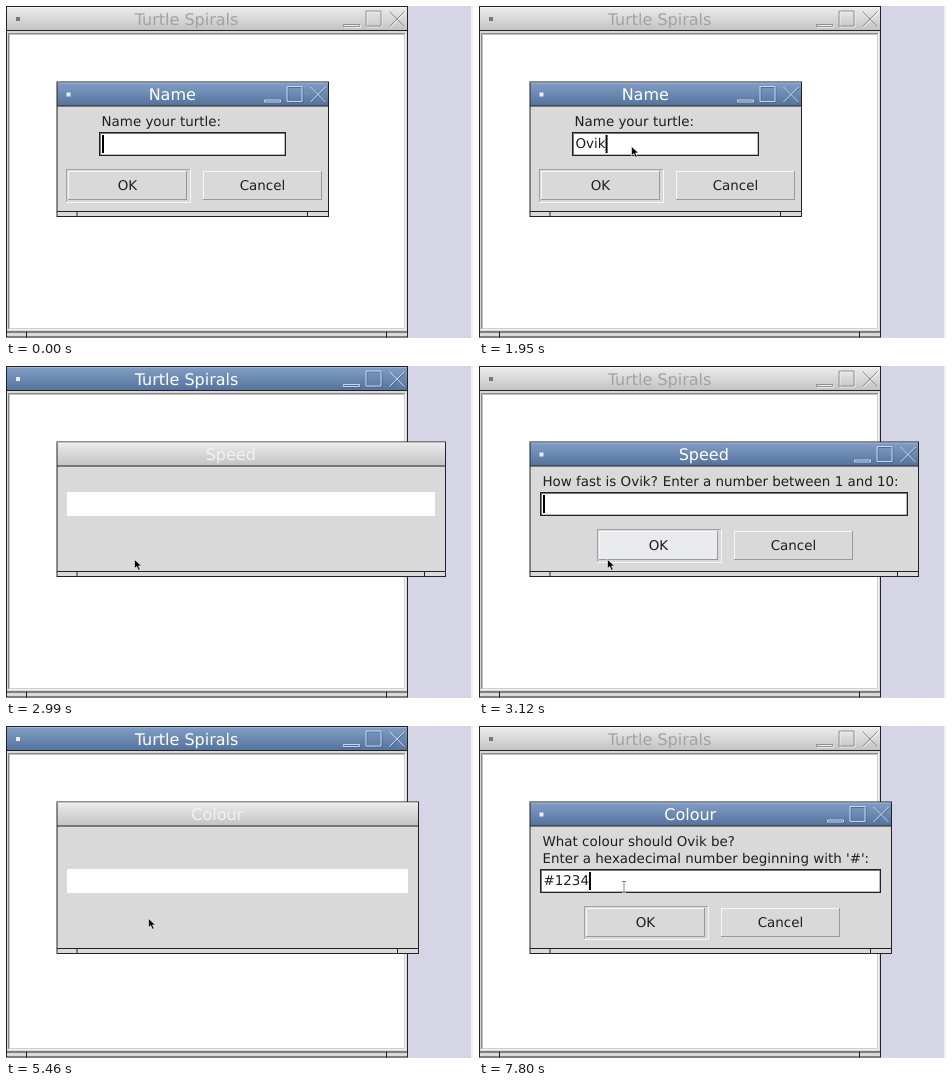
An HTML page that plays this animation: 467 by 332 pixels, repeating every 8 s.

```html
<!DOCTYPE html>
<html lang="en">
<head>
<meta charset="utf-8">
<title>Turtle Spirals</title>
<style>
html, body { margin: 0; width: 467px; height: 332px; overflow: hidden; background: #d6d5e6; }
svg { display: block; }
text { font: 13.45px "DejaVu Sans", sans-serif; white-space: pre; text-rendering: geometricPrecision; }
.title { font-size: 16px; text-anchor: middle; }
.mid { text-anchor: middle; }
</style>
</head>
<body>
<svg id="stage" width="467" height="332" viewBox="0 0 467 332">
  <defs>
    <linearGradient id="on" x2="0" y2="1">
      <stop offset="0" stop-color="#829ec5"/><stop offset="1" stop-color="#54739d"/>
    </linearGradient>
    <linearGradient id="off" x2="0" y2="1">
      <stop offset="0" stop-color="#ececec"/><stop offset="1" stop-color="#c3c3c3"/>
    </linearGradient>
  </defs>
  <g id="view"></g>
</svg>
<script>
const LOOP = 8000;
const view = document.getElementById('view');
const pen = document.createElement('canvas').getContext('2d');
pen.font = '13.45px "DejaVu Sans", sans-serif';

const rect = (x, y, w, h, fill) =>
  `<rect x="${x}" y="${y}" width="${w}" height="${h}" fill="${fill}"/>`;
const text = (x, y, s, cls = '', fill = '#1e1e1e') =>
  `<text x="${x}" y="${y}" class="${cls}" fill="${fill}">${s}</text>`;
const path = (d, stroke, w = 1, fill = 'none') =>
  `<path d="${d}" stroke="${stroke}" stroke-width="${w}" fill="${fill}"/>`;

// One-pixel bevel: light and dark edges around a filled box
const bevel = (x, y, w, h, fill, light, dark) =>
  rect(x, y, w, h, dark) + rect(x, y, w - 1, h - 1, light) + rect(x + 1, y + 1, w - 2, h - 2, fill);

function titleButtons(right, y, active) {
  const shapes = (dx, dy) => {
    const r = right - dx, b = y + dy;
    return `M${r - 64.5} ${b + 18.5}h16v2h-16z M${r - 42} ${b + 5}h15v15h-15z ` +
      `M${r - 18.5} ${b + 5.5}l15 15m0 -15l-15 15`;
  };
  return path(shapes(-1, 1), active ? '#48658f' : '#f6f6f6', .8) +
    path(shapes(0, 0), active ? '#c9d8ee' : '#8f8f8f');
}

function frame(x, y, w, h, title, active, ready = true) {
  const color = active ? '#fff' : ready ? '#a2a2a2' : '#f2f2f2';
  const line = '#222', foot = y + h - 6;
  let s = rect(x, y, w, h, line) +
    rect(x + 1, y + 1, w - 2, 23, `url(#${active ? 'on' : 'off'})`) +
    rect(x + 1, y + 1, w - 2, 1, active ? '#9fb5d3' : '#f5f5f5') +
    rect(x + 1, y + 25, w - 2, h - 31, '#d9d9d9') +
    rect(x + 1, foot + 1, w - 2, 4, '#dadada') +
    rect(x + 20, foot, 1, 6, line) + rect(x + w - 22, foot, 1, 6, line) +
    text(x + w / 2 - 20.5, y + 18.7, title, 'title', color);
  if (ready) {
    s += rect(x + 10, y + 11, 4, 4, active ? '#e4edf8' : '#777') + titleButtons(x + w, y, active);
  }
  return s;
}

function button(cx, y, label, state) {
  const x = Math.round(cx - 59.5), down = state === 'down' ? 1 : 0;
  const fill = state ? '#e9ebee' : '#d9d9d9';
  const [light, dark] = down ? ['#8e9094', '#fff'] : ['#f6f6f6', '#999'];
  return bevel(x, y, 119, 29, fill, light, dark) +
    text(cx + down, y + 19 + 1.5 * down, label, 'mid');
}

function dialog(d, typed, caret, okState) {
  const [ex, ey, ew] = d.entry, by = d.buttonY;
  const tx = ex + 3.5, cx = tx + pen.measureText(typed).width - (typed ? 0 : .5);
  return frame(50.5, 75.5, d.w, d.h, d.title, true) +
    d.labels.map(l => text(...l)).join('') +
    rect(ex, ey, ew, 24, '#222') + rect(ex + 1, ey + 1, ew - 2, 22, '#777') +
    rect(ex + 2, ey + 2, ew - 3.5, 20.5, '#fff') +
    text(tx, ey + 16, typed) +
    (caret ? rect(cx, ey + 3, 2, 18, '#000') : '') +
    bevel(Math.round(d.ok - 62), by - 2, 125, 34, '#d9d9d9', '#a2a2a2', '#f6f6f6') +
    button(d.ok, by, 'OK', okState) + button(d.ok + 135, by, 'Cancel');
}

const blank = d => frame(50.5, 75.5, d.w, d.h, d.title, false, false) +
  rect(d.entry[0], d.entry[1], d.entry[2], 24, '#fff');

const NAME = 'Ovik';
const nameBox = { title: 'Name', w: 272.5, h: 135.5, entry: [93, 126, 187], ok: 121.5, buttonY: 165,
  labels: [[95.5, 120, 'Name your turtle:']] };
const speedBox = { title: 'Speed', w: 389.5, h: 135.5, entry: [61, 126, 368], ok: 179.5, buttonY: 165,
  labels: [[63.5, 120, `How fast is ${NAME}?`], [183.7, 120, 'Enter a number between 1 and 10:']] };
const colourBox = { title: 'Colour', w: 362.5, h: 152.5, entry: [61, 143, 341], ok: 166.5, buttonY: 182,
  labels: [[63.5, 120, `What colour should ${NAME} be?`],
    [63.5, 137, "Enter a hexadecimal number beginning with '#':"]] };

// Latest step whose start time has passed
const at = (steps, t) => steps.filter(s => s[0] <= t).pop();

const scenes = [
  [0, nameBox], [2990, speedBox, 'blank'], [3120, speedBox],
  [5330, null], [5460, colourBox, 'blank'], [5590, colourBox]
];
const keys = new Map([
  [nameBox, [NAME, [260, 390, 520, 650]]],
  [speedBox, ['8', [4420]]],
  [colourBox, ['#1234', [7020, 7150, 7280, 7410, 7670]]]
]);
const caretOff = [[650, 910], [1560, 1820], [2470, 2730], [3900, 4160],
  [4810, 5070], [6240, 6500], [7150, 7410]];
const okStates = [[0, ''], [2730, 'hover'], [2860, 'down'], [3120, 'hover'],
  [5200, 'down'], [5590, 'hover'], [5980, '']];
const pointer = [
  [1690, 156, 138], [1820, 154, 140], [1950, 153, 141],
  [2340, 150, 148], [2470, 142, 165], [2600, 134, 183], [2730, 129, 194],
  [4680, 137, 194], [4810, 143, 193],
  [5980, 144, 184], [6110, 145, 171], [6240, 145, 161, 'beam']
];

function drawPointer(t) {
  const p = at(pointer, t);
  if (!p) return '';
  const [, x, y, beam] = p;
  if (beam) return path(`M${x - 2} ${y - 5.5}h4m-2 0v11m-2 0h4`, '#888');
  return path(`M${x - .5} ${y - .5}v9l2.2 -2 1.8 3.8 1.7 -.8 -1.7 -3.6h3z`, '#fff', .6, '#000');
}

function draw(t) {
  const [, box, isBlank] = at(scenes, t);
  const mainActive = !box || !!isBlank;
  let s = rect(0, 0, 467, 332, '#d6d5e6') + rect(465, 0, 2, 332, '#f0f0f5') +
    frame(0, 0, 402, 331.5, 'Turtle Spirals', mainActive) +
    bevel(2, 27, 398, 297, '#fff', '#8a8a8a', '#f2f2f2') +
    rect(3, 28, 395, 1, '#c4c4c4') + rect(3, 28, 1, 294, '#c4c4c4') +
    rect(398, 28, 1, 295, '#d0d0d0') + rect(3, 322, 396, 1, '#d0d0d0');
  if (isBlank) s += blank(box);
  else if (box) {
    const [word, times] = keys.get(box);
    const typed = word.slice(0, times.filter(k => k <= t).length);
    const caret = !caretOff.some(([a, b]) => t >= a && t < b);
    s += dialog(box, typed, caret, at(okStates, t)[1]);
  }
  return s + drawPointer(t);
}

let last = '';
function tick() {
  const s = draw(performance.now() % LOOP);
  if (s !== last) view.innerHTML = last = s;
  requestAnimationFrame(tick);
}
tick();
</script>
</body>
</html>
```
